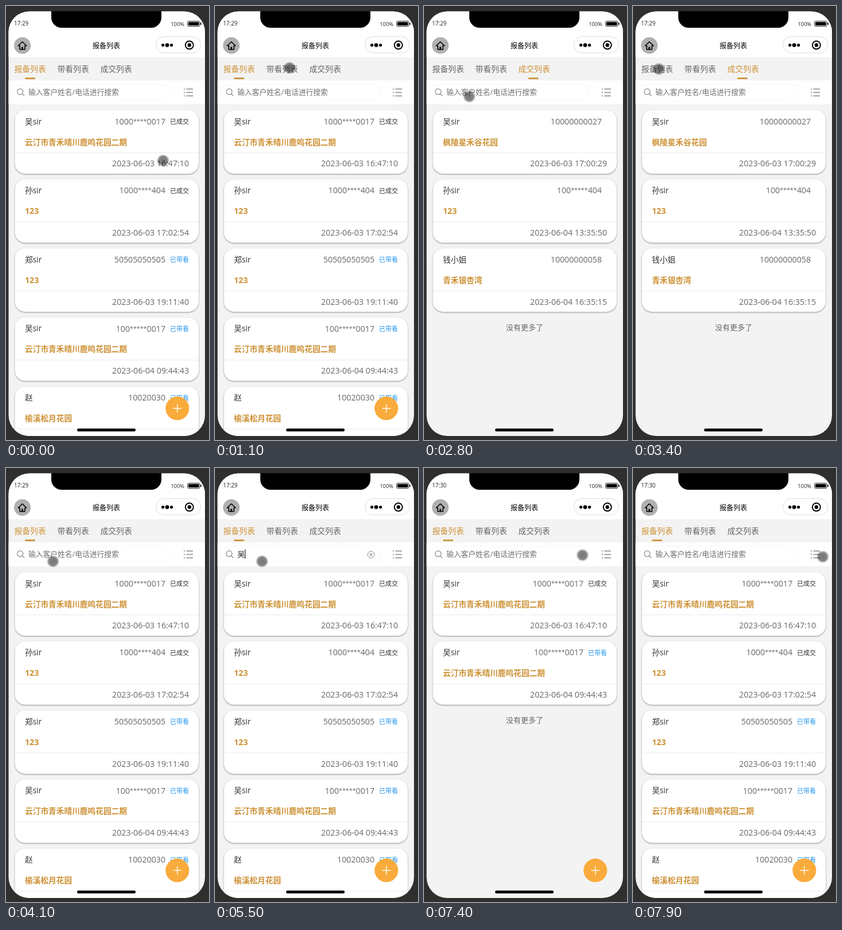
These frames come from a looping animation (354 by 758 pixels, 8000 ms). An HTML page:

```html
<!DOCTYPE html>
<html lang="zh-CN">
<head>
<meta charset="utf-8">
<title>报备列表</title>
<style>
html, body { margin: 0; width: 100%; height: 100%; overflow: hidden; background: #2f2f2f; }
svg { display: block; font-family: "Open Sans", "Noto Sans CJK SC", "Noto Sans CJK", "Noto Sans CJK JP", sans-serif; }
.card { filter: drop-shadow(0 1px .8px rgba(0, 0, 0, .42)); }
.end { text-anchor: end; }
.mid { text-anchor: middle; }
.bold { font-weight: 700; }
</style>
</head>
<body>
<svg id="stage" width="354" height="758" viewBox="0 0 354 758"></svg>
<script>
const GOLD = '#cd9134', GREY = '#666';
const STATUS = { 已成交: '#333', 已带看: '#2496ee', 已报备: '#e03434' };
const TABS = [['报备列表', 14.5, 42], ['带看列表', 89.5, 117], ['成交列表', 164.5, 190.7]];
const PARK = '云汀市青禾晴川鹿鸣花园二期', GROVE = '榆溪松月花园';

// name, phone, estate, time, status
const reported = [
  ['吴sir', '1000****0017', PARK, '2023-06-03 16:47:10', '已成交'],
  ['孙sir', '1000****404', '123', '2023-06-03 17:02:54', '已成交'],
  ['郑sir', '50505050505', '123', '2023-06-03 19:11:40', '已带看'],
  ['吴sir', '100*****0017', PARK, '2023-06-04 09:44:43', '已带看'],
  ['赵', '10020030', GROVE, '2023-06-04 09:56:20', '已带看']
];
const visited = [
  ['吴sir', '100*****0017', PARK, '2023-06-03 16:58:55', '已报备'],
  ['吴sir', '100*****0017', PARK, '2023-06-04 09:45:34', '已报备'],
  ['赵', '100*0030', GROVE, '2023-06-04 09:57:55', '已报备'],
  ['孙sir', '100*****404', '123', '2023-06-04 13:33:56', '已报备'],
  ['冯先生', '100*0066', GROVE, '2023-06-04 14:10:22', '已报备']
];
const closed = [
  ['吴sir', '10000000027', '枫陵星禾谷花园', '2023-06-03 17:00:29'],
  ['孙sir', '100*****404', '123', '2023-06-04 13:35:50'],
  ['钱小姐', '10000000058', '青禾银杏湾', '2023-06-04 16:35:15']
];
const lists = [reported, visited, closed, reported.filter(r => r[0].startsWith('吴'))];

// Text centred vertically on y
const text = (x, y, size, fill, str, cls = '', id = '') =>
  `<text id="${id}" class="${cls}" x="${x}" y="${y + size * .375}" font-size="${size}" fill="${fill}">${str}</text>`;
const rect = (x, y, w, h, fill, r = 0, more = '') =>
  `<rect x="${x}" y="${y}" width="${w}" height="${h}" rx="${r}" fill="${fill}" ${more}/>`;
const circle = (x, y, r, fill, more = '') =>
  `<circle cx="${x}" cy="${y}" r="${r}" fill="${fill}" ${more}/>`;
const line = (d, color, width, more = '') =>
  `<path d="${d}" fill="none" stroke="${color}" stroke-width="${width}" ${more}/>`;

const stars = s => s.replace(/\*+/g, '<tspan font-size="10.7" baseline-shift="2">$&</tspan>');

function card([name, phone, estate, date, status], i) {
  const y = 182 + 120.6 * i;
  return rect(15.5, y, 320.5, 111, '#fff', 18, 'class="card"') +
    text(33, y + 19.5, 13.7, '#333', name) +
    text(status ? 278 : 310, y + 19.5, 14.2, GREY, stars(phone), 'end') +
    (status ? text(319, y + 20, 11, STATUS[status], status, 'end') : '') +
    text(33, y + 55.5, estate === '123' ? 14.2 : 13.7, GOLD, estate, 'bold') +
    rect(15.5, y + 74, 320.5, 1, '#ebebeb') +
    text(319, y + 93, 14.2, GREY, date, 'end');
}

const listGroup = (rows, i) => `<g id="list${i}">` + rows.map(card).join('') +
  (rows.length < 5 ? text(175.5, 199.3 + 120.6 * rows.length, 13, GREY, '没有更多了', 'mid') : '') + '</g>';

const bullets = [145, 151, 157].map(y => line(`M310 ${y}h2M314.5 ${y}h11.5`, '#888', 1.4)).join('');

stage.innerHTML = `
<defs>
  <clipPath id="screen">${rect(4.5, 9.5, 342.5, 741.5, '#fff', 36)}</clipPath>
  <radialGradient id="touch">
    <stop offset="0" stop-color="#000" stop-opacity=".54"/>
    <stop offset=".7" stop-color="#000" stop-opacity=".48"/>
    <stop offset=".82" stop-color="#000" stop-opacity=".3"/>
    <stop offset="1" stop-color="#000" stop-opacity=".12"/>
  </radialGradient>
</defs>
<g clip-path="url(#screen)">` +
  rect(0, 0, 354, 758, '#f3f3f3') +
  lists.map(listGroup).join('') +
  rect(0, 0, 354, 89.5, '#fff') + rect(0, 130, 354, 41.5, '#fff') +
  // status bar
  text(14, 30.5, 9.9, '#222', '17:29', '', 'clock') +
  text(311, 31, 9.4, '#222', '100%', 'end') +
  rect(316.5, 26.5, 21.5, 9, '#fff', 2, 'stroke="#222"') + rect(318, 28, 18.5, 6, '#000', 1) + rect(339, 29, 1.8, 4, '#222', .8) +
  // navigation bar
  circle(28.5, 69, 14.5, '#b0b0b0') +
  line('M21.3 69.5L28.5 62.5L35.7 69.5H33V76H24V69.5Z', '#000', 1.6, 'stroke-linejoin="round"') +
  rect(27, 71.5, 3, 4.5, '#000') +
  text(175, 69.5, 12, '#000', '报备列表', 'mid') +
  rect(261.5, 53.5, 78, 28.5, '#fff', 14.2, 'stroke="#dcdcdc"') +
  circle(273.6, 68.3, 2.6, '#000') + circle(281, 68.3, 3.4, '#000') + circle(288.6, 68.3, 2.6, '#000') +
  circle(319.8, 68.3, 7, 'none', 'stroke="#000" stroke-width="2"') + circle(319.8, 68.3, 3.2, '#000') +
  // tabs
  TABS.map(([label, x], i) => text(x, 110, 13.8, GREY, label, '', 'tab' + i)).join('') +
  rect(-9, 125, 18, 2.8, GOLD, 1.4, 'id="bar"') +
  // search
  rect(11.5, 136.5, 276, 28.5, '#fff', 14, 'stroke="#f7f7f7"') +
  circle(24.7, 149.7, 5, 'none', 'stroke="#888" stroke-width="1.2"') + line('M28.4 153.4L32 157', '#888', 1.3) +
  text(39, 150.5, 12.75, '#707070', '输入客户姓名/电话进行搜索', '', 'hint') +
  text(39, 150.5, 13, '#222', '', '', 'query') +
  rect(0, 142.5, 1, 16, '#000', 0, 'id="caret"') +
  `<g id="clear">${circle(272, 151.3, 5.8, 'none', 'stroke="#888"')}${line('M269.6 148.9l4.8 4.8m0-4.8l-4.8 4.8', '#888', 1.1)}</g>` +
  bullets +
  `<g id="add">${circle(298.8, 702.7, 20.6, '#f9ab3b')}${line('M291.3 702.7h15m-7.5-7.5v15', '#fff', 1.4)}</g>` +
  rect(124, 738, 102, 5, '#000', 2.5) +
  circle(0, 0, 10.6, 'url(#touch)', 'id="cursor"') +
  // notch
  '</g><path d="M79 9H271V20A18 18 0 0 1 253 38H97A18 18 0 0 1 79 20Z"/>';

const el = id => document.getElementById(id);
const show = (id, on) => el(id).setAttribute('display', on ? 'inline' : 'none');

// time, x, y
const path = [
  [0, 274, 270], [900, 118, 137], [1100, 130, 108], [1400, 130, 108], [2100, 221, 119],
  [2300, 221, 119], [2500, 203, 112], [2800, 79, 158], [3100, 62, 140], [3400, 45, 110],
  [3600, 45, 110], [4100, 82, 163], [6000, 82, 163], [6700, 235, 171], [6800, 240, 169],
  [7100, 272, 152], [7300, 272, 152], [7900, 331, 155], [8000, 331, 155]
];
const tabSteps = [[0, 0], [1400, 1], [2400, 2], [3500, 0]];
const listSteps = [[0, 0], [1600, 1], [2600, 2], [3700, 0], [6100, 3], [7500, 0]];
const typing = [[0, ''], [4300, ''], [4800, 'w'], [5000, 'wu'], [5500, '吴'], [7300, '']];

const stepAt = (steps, t) => steps.findLastIndex(s => s[0] <= t);
const ease = p => p * p * (3 - 2 * p);

function cursorAt(t) {
  const i = Math.min(stepAt(path, t), path.length - 2);
  const [t0, x0, y0] = path[i], [t1, x1, y1] = path[i + 1];
  const p = ease((t - t0) / (t1 - t0));
  return [x0 + (x1 - x0) * p, y0 + (y1 - y0) * p];
}

function draw(t) {
  const step = stepAt(tabSteps, t), [since, tab] = tabSteps[step];
  const from = TABS[tabSteps[Math.max(step - 1, 0)][1]][2];
  const slide = ease(Math.min(1, (t - since) / 300));
  el('bar').setAttribute('transform', `translate(${from + (TABS[tab][2] - from) * slide})`);
  TABS.forEach((_, i) => el('tab' + i).setAttribute('fill', i === tab ? GOLD : GREY));

  const list = listSteps[stepAt(listSteps, t)][1];
  lists.forEach((_, i) => show('list' + i, i === list));
  show('add', tab === 0);

  const [typed, word] = typing[stepAt(typing, t)];
  const query = el('query');
  query.textContent = word;
  show('hint', !word);
  show('clear', word);
  show('caret', t >= 4300 && t < 7300 && (t - typed) % 1000 < 500);
  el('caret').setAttribute('x', 39 + (word ? query.getComputedTextLength() : 0));

  el('clock').textContent = t < 6900 ? '17:29' : '17:30';
  el('cursor').setAttribute('transform', `translate(${cursorAt(t)})`);
}

const start = performance.now();
function tick() {
  const t = (performance.now() - start) % 8000;
  draw(Math.floor(t / 100) * 100);
  requestAnimationFrame(tick);
}
tick();
</script>
</body>
</html>
```
